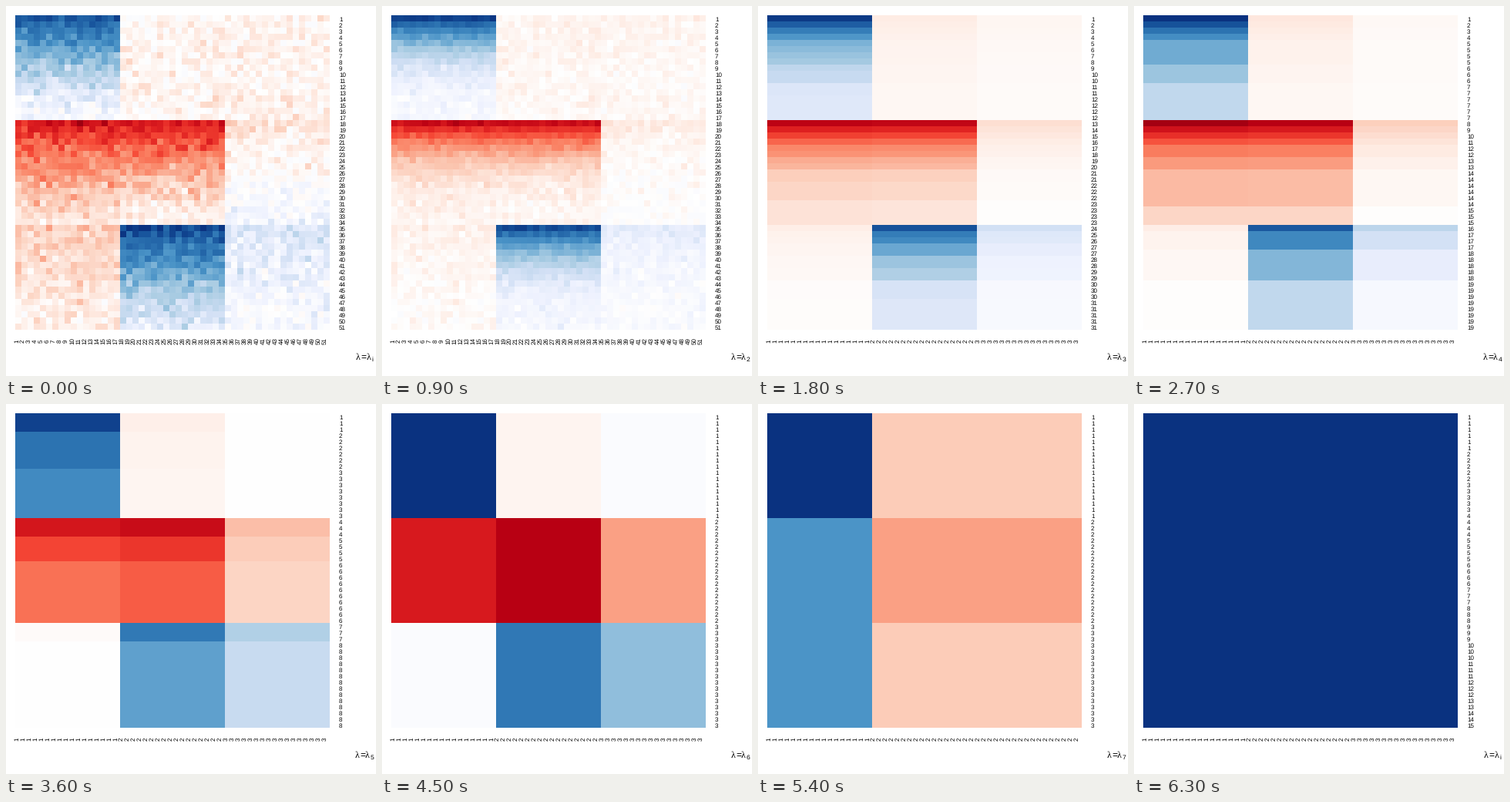
Recreate the animation shown at these times as a matplotlib script. Size 480 px wide and 480 px high, loop 7200 ms.

```python
import numpy as np
import matplotlib.pyplot as plt
from matplotlib.animation import FuncAnimation
from matplotlib.colors import LinearSegmentedColormap

plt.rcParams["text.hinting"] = "none"

SIZE, DPI = 480, 100
N, B = 51, 17            # cells per side, cells per block
LEFT, CELL = 12, 8
END = LEFT + N * CELL
PT = 72 / DPI            # points per pixel

BLUES = "#0a3280 #18559d #3078b5 #4a93c7 #7eb4d7 #adcee4 #d0dff4 #edf1fe"
REDS = "#fee7dd #fcccb8 #faa286 #fa7e60 #f64a37 #e12222 #bc0114 #67000d"
CMAP = LinearSegmentedColormap.from_list(
    "blue_red", [*BLUES.split(), "#ffffff", *REDS.split()], N=1025)


def ramp_grid(sizes, first, last, power=1):
    """Fade every block from its first to its last value over its row groups.

    sizes holds the group heights of each block row; first and last are 3x3.
    """
    rows = []
    for groups, a, b in zip(sizes, np.array(first), np.array(last)):
        fade = (1 - np.linspace(0, 1, len(groups))[:, None]) ** power
        rows.append(np.repeat(b + (a - b) * fade, groups, axis=0))
    return np.repeat(np.vstack(rows), B, axis=1)


def block_grid(values):
    return np.kron(values, np.ones((B, B)))


def average_rows(grid, sizes):
    parts = np.split(grid, np.cumsum(sum(sizes, []))[:-1])
    return np.vstack([np.tile(p.mean(0), (len(p), 1)) for p in parts])


def noisy(grid, amount):
    """Add the shared noise, hardly letting a cell cross to the other sign."""
    side = np.where(grid < 0, -1, 1)
    return side * np.clip(side * (grid + amount * NOISE), -.03, 1)


def labels(sizes):
    flat = np.hstack(sizes)
    return np.repeat(np.arange(1, len(flat) + 1), flat)


NOISE = np.random.default_rng(7).normal(0, 1, (N, N))
SINGLE = [[1] * B] * 3
FINE = [[1] * 9 + [2, 2, 4], [1] * 8 + [2, 3, 4], [1] * 3 + [2] * 3 + [3, 5]]
MEDIUM = [[1] * 4 + [4, 3, 6], [1] * 4 + [2, 2, 6, 3], [1, 3, 5, 8]]
COARSE = [[3, 6, 8], [3, 4, 10], [3, 14]]
THIRDS = [[B]] * 3
LAST = [6] + [5] * 2 + [4] * 3 + [3] * 6 + [2] * 2 + [1]

rough = ramp_grid(SINGLE,
                  [(-.86, .06, .06), (.78, .78, .12), (.24, -.95, -.2)],
                  [(-.05, .06, .06), (.14, .05, -.06), (.08, -.18, -.05)], 1.3)
shrunk = ramp_grid(SINGLE,
                   [(-.94, .07, .06), (.83, .83, .09), (.08, -.91, -.16)],
                   [(-.06, .04, .03), (.06, .04, 0), (.02, -.07, -.04)], 2.6)
medium = ramp_grid(MEDIUM,
                   [(-1, .12, .035), (.91, .88, .23), (.09, -.86, -.32)],
                   [(-.3, .04, .02), (.2, .2, .01), (.01, -.3, -.06)])
blocks = block_grid([(-1, .055, -.03), (.78, .88, .38), (-.03, -.75, -.45)])
two_cols = block_grid([(-1, .25, .25), (-.62, .38, .38), (-.62, .25, .25)])

single, thirds = labels(SINGLE), labels(THIRDS)
STAGES = [  # cells, row labels, column labels, subscript
    (noisy(rough, .065), single, single, "i"),
    (noisy(shrunk, .03), single, single, "2"),
    (average_rows((shrunk + medium) / 2, FINE), labels(FINE[0] + FINE[1] + FINE[2]),
     thirds, "3"),
    (medium, labels(sum(MEDIUM, [])), thirds, "4"),
    (average_rows((medium + blocks) / 2, COARSE), labels(sum(COARSE, [])),
     thirds, "5"),
    (blocks, thirds, thirds, "6"),
    (two_cols, thirds, labels([B, 2 * B]), "7"),
    (np.full((N, N), -1.0), labels(LAST), thirds, "i"),
]

fig = plt.figure(figsize=(SIZE / DPI, SIZE / DPI), dpi=DPI, facecolor="white")
ax = fig.add_axes([0, 0, 1, 1])
ax.axis("off")
image = ax.imshow(STAGES[0][0], cmap=CMAP, vmin=-1, vmax=1,
                  extent=(LEFT, END, END, LEFT),
                  interpolation="nearest", aspect="auto")
ax.set_xlim(0, SIZE)
ax.set_ylim(SIZE, 0)


def put(x, y, s="", size=8, font="Liberation Sans", **kw):
    return ax.text(x, y, s, fontsize=size * PT, family=font, color="black",
                   va="baseline", **kw)


row_texts = [put(432, 20 + CELL * i) for i in range(N)]
col_texts = [put(16 + CELL * i, 435, ha="center", rotation=90,
                 rotation_mode="anchor") for i in range(N)]
caption = [put(0, 459, "λ", 12, "Liberation Serif"), put(0, 459, "=", 12),
           put(0, 459, "λ", 12, "Liberation Serif"), put(0, 461, "", 8.5)]


def draw(k):
    cells, rows, cols, sub = STAGES[k]
    image.set_data(cells)
    for texts, numbers in ((row_texts, rows), (col_texts, cols)):
        for t, n in zip(texts, numbers):
            t.set_text(str(n))
    start = 454 if sub == "i" else 452.5
    for t, dx in zip(caption, (0, 6.6, 13.6, 20.4)):
        t.set_x(start + dx)
    caption[-1].set_text(sub)
    return [image, *row_texts, *col_texts, *caption]


anim = FuncAnimation(fig, draw, frames=len(STAGES), interval=900,
                     repeat=True, repeat_delay=0, blit=False)
plt.show()
```
